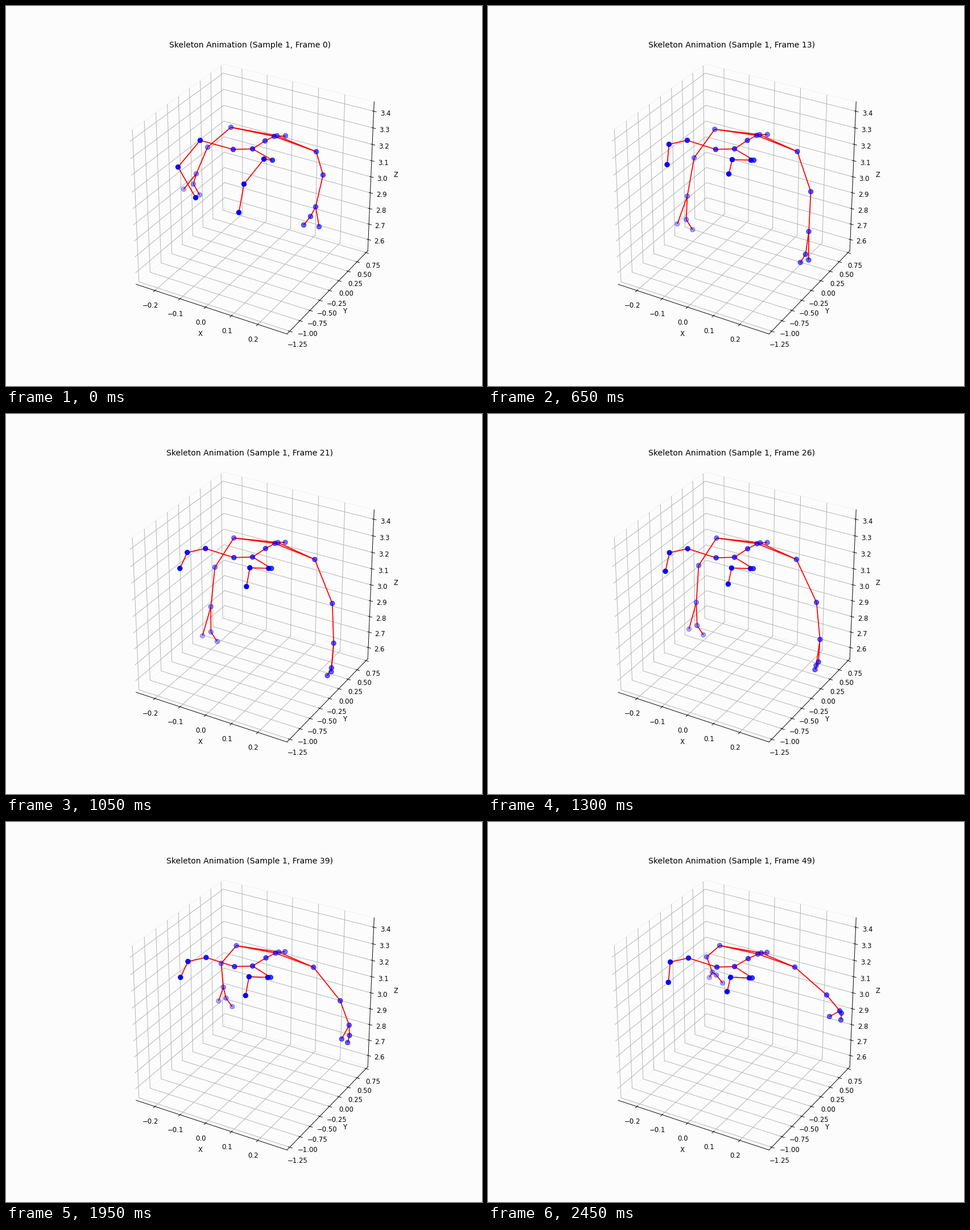
A matplotlib script for the animation above (2500 ms loop, 837 by 669 pixels).

```python
import numpy as np
import matplotlib.pyplot as plt
from matplotlib.animation import FuncAnimation
from matplotlib.collections import LineCollection

W, H = 837, 669
FRAMES, INTERVAL = 50, 50
BG = "#fcfcfc"

# Motion curves, one value per frame.
frame = np.arange(FRAMES)
drift = frame / (FRAMES - 1)                      # steady, whole loop
settle = 1 - (1 - np.minimum(frame / 7, 1)) ** 2  # quick kick, then rest
swing = np.sin(np.pi * drift ** 0.8) ** 1.5       # down and up again
wobble = settle * np.cos(2 * np.pi * (frame - 21) / 18)

joints = {"origin": np.zeros((FRAMES, 2))}
opacity, links = {}, []


def limb(shade, fade, ease, *bones):
    """Add bones as (joint, parent, first offset, last offset, sag) in pixels."""
    for k, (name, parent, first, last, sag) in enumerate(bones):
        offset = np.outer(1 - ease, first) + np.outer(ease, last)
        offset[:, 1] += sag * swing
        joints[name] = joints[parent] + offset
        opacity[name] = min(shade + fade * k, 1)
        if parent != "origin":
            links.append((parent, name))


limb(0.74, -0.055, drift,
     ("base", "origin", (433, 251), (433, 254), -1),
     ("mid", "base", (22, -14), (24, -14), -1),
     ("chest", "mid", (16, -8), (17, -8), -1),
     ("neck", "chest", (5, -1), (6, -2), 0),
     ("head", "neck", (15, 0), (10, -1), 0))
limb(0.74, 0.02, drift,
     ("hip_r", "base", (-34, 1), (-31, 1), 0),
     ("hip_l", "base", (35, 20), (31, 20), 0))
limb(0.88, 0.05, settle,
     ("knee_r", "hip_r", (-58, -16), (-50, -16), 0),
     ("ankle_r", "knee_r", (-39, 47), (-32, 7), 0),
     ("foot_r", "ankle_r", (31, 54), (-8, 32), 0))
limb(0.97, 0.02, settle,
     ("knee_l", "hip_l", (-15, -2), (-5, 0), 0),
     ("ankle_l", "knee_l", (-35, 44), (-33, -1), 0),
     ("foot_l", "ankle_l", (-9, 50), (-6, 29), 0))
limb(0.52, -0.04, drift,
     ("shoulder_r", "chest", (-76, -16), (-67, -15), 6),
     ("elbow_r", "shoulder_r", (-41, 35), (-23, 20), 23),
     ("wrist_r", "elbow_r", (-20, 47), (10, 27), 31),
     ("hand_r", "wrist_r", (-5, 18), (7, 5), 32),
     ("tip_r", "hand_r", (11, 19), (11, 14), 0),
     ("thumb_r", "wrist_r", (-22, 27), (-5, 9), 32))
limb(0.66, -0.01, drift,
     ("shoulder_l", "chest", (74, 27), (65, 23), 3),
     ("elbow_l", "shoulder_l", (12, 41), (56, 49), 33),
     ("wrist_l", "elbow_l", (-13, 56), (23, 28), 26),
     ("hand_l", "wrist_l", (-9, 17), (3, 4), 32),
     ("tip_l", "hand_l", (-12, 15), (-1, 12), 0),
     ("thumb_l", "wrist_l", (6, 35), (-18, 10), 26))
links += [("neck", "shoulder_r"), ("neck", "shoulder_l")]
joints["foot_r"] += np.outer(wobble, (-5, -4))
joints["foot_l"] += np.outer(wobble, (0, 4))

names = sorted(opacity, key=opacity.get)  # far joints first
paths = np.stack([joints[n] for n in names], axis=1)
ends = np.array([[names.index(n) for n in pair] for pair in links])
colors = [(0, 0, 1, opacity[n]) for n in names]

fig = plt.figure(figsize=(10.009, 8), dpi=83.625, facecolor=BG)
ax = fig.add_subplot(111, projection="3d", facecolor=BG)
ax.set_box_aspect([1, 1, 1])
ax.set_xticks(np.arange(-2, 3) / 10)
ax.set_yticks(np.arange(-5, 4) / 4)
ax.set_zticks(np.arange(26, 35) / 10)
ax.set_xlim(-0.276, 0.3088, view_margin=0)
ax.set_ylim(-1.3143, 0.8007, view_margin=0)
ax.set_zlim(2.526, 3.456, view_margin=0)
ax.set_xlabel("X")
ax.set_ylabel("Y")
ax.set_zlabel("Z")
for axis in (ax.xaxis, ax.yaxis, ax.zaxis):
    axis.set_pane_color(BG)
    axis.pane.set_edgecolor("#f3f3f3")
title = ax.set_title("")

# The skeleton lies on a layer measured in stage pixels.
layer = fig.add_axes([0, 0, 1, 1])
layer.set_xlim(0, W)
layer.set_ylim(H, 0)
layer.axis("off")
lines = LineCollection([], colors="red", linewidths=1.5, zorder=2)
layer.add_collection(lines, autolim=False)
dots = layer.scatter(*paths[0].T, s=50, c=colors, zorder=3)


def update(i):
    pos = paths[i] + 0.5  # pixel centres
    lines.set_segments(pos[ends])
    dots.set_offsets(pos)
    title.set_text(f"Skeleton Animation (Sample 1, Frame {i})")
    return lines, dots, title


anim = FuncAnimation(fig, update, frames=FRAMES, interval=INTERVAL,
                     repeat=True, repeat_delay=0, blit=False)
plt.show()
```
